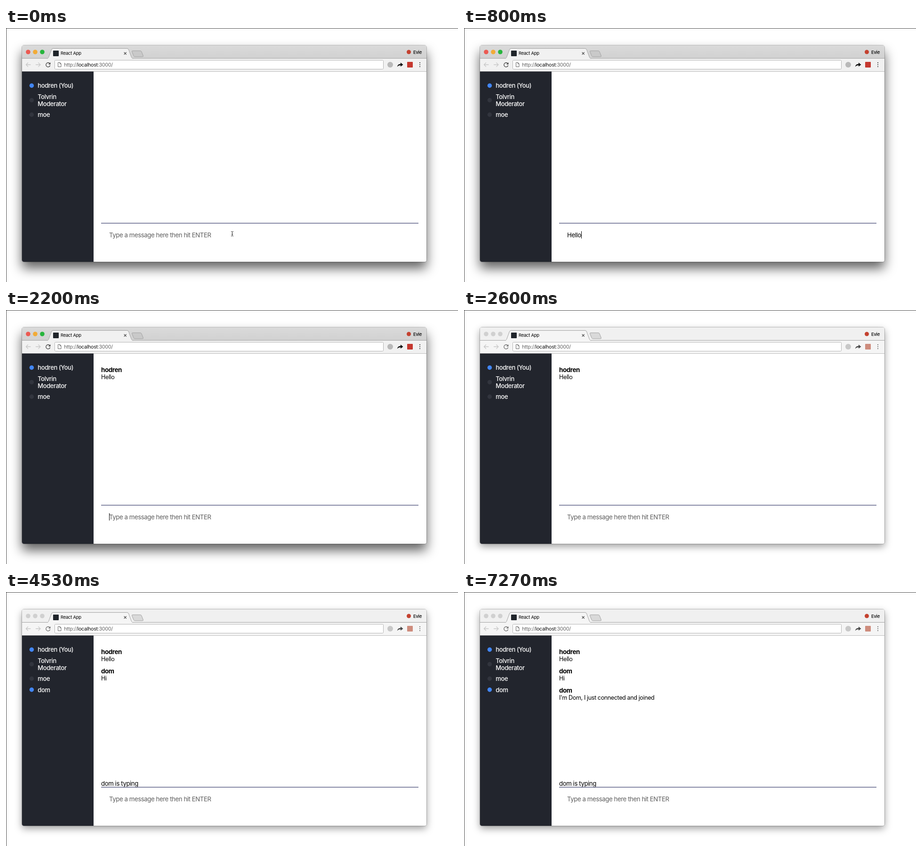
Animation, 960 px wide and 540 px high, one loop 8000 ms. Source, as an HTML page:

```html
<!DOCTYPE html>
<html lang="en">
<head>
<meta charset="utf-8">
<title>Chat demo</title>
<style>
  html, body { margin: 0; width: 100%; height: 100%; overflow: hidden; background: #fff; }
  svg { display: block; width: 960px; height: 540px; }
  text { font: 13.2px Inter, "Open Sans", sans-serif; letter-spacing: -.031em; white-space: pre; }
  .name { font-weight: 700; font-size: 13.4px; }
  .msg { font-size: 12.57px; }
  .side { fill: #fff; font-weight: 500; font-size: 13px; }
  .hint { fill: #5d5d5d; }
  .tab { font-size: 9.5px; }
  .url { font-size: 10.8px; fill: #666; }
  .line { fill: none; stroke-width: 1.3; }
</style>
</head>
<body>
<svg viewBox="0 0 960 540">
  <defs>
    <filter id="wide" x="-10%" y="-15%" width="120%" height="135%"><feGaussianBlur stdDeviation="12"/></filter>
    <filter id="soft" x="-10%" y="-15%" width="120%" height="130%"><feGaussianBlur stdDeviation="8"/></filter>
    <linearGradient id="bar" x2="0" y2="1"><stop stop-color="#dadada"/><stop offset="1" stop-color="#d1d1d1"/></linearGradient>
    <clipPath id="frame"><rect x="34" y="37" width="859" height="460" rx="4"/></clipPath>
  </defs>
  <rect width="960" height="540" fill="#fff"/>
  <rect id="shadowOn" x="34" y="51" width="859" height="460" rx="4" fill-opacity=".62" filter="url(#wide)"/>
  <rect id="shadowOff" x="34" y="43" width="859" height="460" rx="4" fill-opacity=".38" filter="url(#soft)"/>
  <path d="M0 .5H960M.5 0V540" stroke="#4a4a4a"/>
  <rect x="33.5" y="36.5" width="860" height="461" rx="4.5" fill="none" stroke="#000" stroke-opacity=".22"/>

  <g clip-path="url(#frame)">
    <rect x="34" y="37" width="859" height="460" fill="#fff"/>
    <rect id="titleBar" x="34" y="37" width="859" height="28"/>
    <rect id="toolBar" x="34" y="64" width="859" height="28"/>
    <path d="M34 64.5H88M269 64.5H893" stroke="#a3a3a3"/>
    <path d="M34 92.5H893" stroke="#bdbdbd"/>
    <path id="tabShape" d="M87 65C90 64.5 90 63 91 61L96.500 46Q97.500 43.500 100 43.500H257Q259.500 43.500 260.500 46L266 61C267 63 267 64.500 270 65" stroke="#a3a3a3"/>
    <path id="newTab" d="M269 48.500H285Q287 48.500 287.700 50L291.300 59Q292 61 290 61H274Q272 61 271.300 59.500L267.600 50.500Q267 48.500 269 48.500Z" stroke="#a3a3a3"/>
    <g id="lights"></g>
    <rect x="100" y="48" width="12" height="12" rx="1" fill="#20252b"/>
    <text class="tab" x="116" y="57.300">React App</text>
    <path d="M250.700 51.500l5 5m0-5l-5 5" stroke="#4c4c4c" stroke-width="1.200"/>
    <circle cx="855.500" cy="51" r="4.500" fill="#c4412f"/>
    <text class="tab" x="865" y="54.500" font-weight="500" style="font-weight:500">Evie</text>

    <rect x="103.500" y="68.500" width="698" height="19" rx="2" fill="#fff" stroke="#b4b4b4"/>
    <path class="line" d="M52.500 78H42.500M47 73.500L42.500 78L47 82.500M63 78H73M68.500 73.500L73 78L68.500 82.500" stroke="#c9c9c9"/>
    <path d="M110.500 73.500H114.500L117 76V82.500H110.500ZM114.500 73.500V76H117" fill="none" stroke="#666"/>
    <text class="url" x="123" y="81.600">http://<tspan fill="#111">localhost</tspan>:3000/</text>
    <g id="icons">
      <path class="line" d="M93 75.600A4.500 4.500 0 1 0 93.700 79.500" stroke="#444" stroke-width="1.500"/>
      <path d="M94.500 73V77.500H90Z" fill="#444"/>
      <circle cx="816" cy="78" r="6" fill="#b9b9b9"/>
      <path d="M831 82.500C831.500 78.500 834 76.500 838 76.500V73.500L843.500 78L838 82V79.300C835 79.300 833 80 831 82.500Z" fill="#111"/>
      <rect id="badge" x="852" y="72" width="12" height="12" rx="1"/>
      <path d="M879 73.900h.01M879 78h.01M879 82.100h.01" stroke="#444" stroke-width="2.200" stroke-linecap="round"/>
    </g>

    <rect x="34" y="92.500" width="152" height="405" fill="#22252d"/>
    <g id="people"></g>
    <g id="messages"></g>
    <text id="typing" x="202" y="412">dom is typing</text>
    <path d="M202 415H876" stroke="#5f6388" stroke-width="1.300"/>
    <text id="hint" class="hint" x="219" y="445">Type a message here then hit ENTER</text>
    <text id="draft" x="219" y="445"></text>
    <path id="caret" d="M0 432V447.500" stroke="#000"/>
    <path id="beam" d="M478 432.500Q480.500 432.500 480.500 434.500V440.500Q480.500 442.500 478 442.500M483 432.500Q480.500 432.500 480.500 434.500M480.500 440.500Q480.500 442.500 483 442.500M479 438.500H482" fill="none" stroke="#333"/>
  </g>
</svg>
<script>
const LOOP = 8000;
const BLUR_AT = 2600, SENT_AT = 1130;
const KEY_TIMES = [200, 400, 530, 670, 800];
const WORD = 'Hello';
const NS = 'http://www.w3.org/2000/svg';
const $ = id => document.getElementById(id);

function add(parent, tag, attrs, text) {
  const el = document.createElementNS(NS, tag);
  for (const key in attrs) el.setAttribute(key, attrs[key]);
  if (text) el.textContent = text;
  parent.appendChild(el);
  return el;
}

const show = (el, on) => el.setAttribute('visibility', on ? 'visible' : 'hidden');
const within = (t, from, to) => t >= from && t < to;

const lights = ['#ec5a52', '#f2ab37', '#27b53c'].map((color, i) =>
  ({ color, el: add($('lights'), 'circle', { cx: 47 + 15 * i, cy: 51, r: 4.8 }) }));

function person(y, online, lines, at = 0) {
  const el = add($('people'), 'g', {});
  add(el, 'circle', { cx: 54.5, cy: y, r: 4.7, fill: online ? '#4286f5' : '#32353e' });
  const top = y + 4.8 - (lines.length - 1) * 7.7;
  lines.forEach((line, i) =>
    add(el, 'text', { class: 'side', x: 67.3, y: top + 15.4 * i }, line));
  return { el, at };
}

function message(y, name, body, at) {
  const el = add($('messages'), 'g', {});
  add(el, 'text', { class: 'name', x: 202, y }, name);
  add(el, 'text', { class: 'msg', x: 202, y: y + 15 }, body);
  return { el, at };
}

const arrivals = [
  person(122.5, true, ['hodren (You)']),
  person(153.5, false, ['Tolvrin', 'Moderator']),
  person(184.3, false, ['moe']),
  person(207.8, true, ['dom'], 2730),
  message(132, 'hodren', WORD, 1400),
  message(173.3, 'dom', 'Hi', 4530),
  message(214, 'dom', "I'm Dom, I just connected and joined", 6800)
];

function drawWindow(active) {
  show($('shadowOn'), active);
  show($('shadowOff'), !active);
  $('titleBar').setAttribute('fill', active ? 'url(#bar)' : '#f0f0f0');
  $('toolBar').setAttribute('fill', active ? '#f1f1f1' : '#f5f5f5');
  $('tabShape').setAttribute('fill', active ? '#f1f1f1' : '#f5f5f5');
  $('newTab').setAttribute('fill', active ? '#c9c9c9' : '#d9d9d9');
  $('badge').setAttribute('fill', active ? '#c5382f' : '#c26a55');
  $('icons').setAttribute('opacity', active ? 1 : 0.75);
  lights.forEach(({ el, color }) => el.setAttribute('fill', active ? color : '#d0d0d0'));
}

function drawInput(t) {
  const typed = t < SENT_AT ? KEY_TIMES.filter(k => t >= k).length : 0;
  const draft = $('draft');
  draft.textContent = WORD.slice(0, typed);
  show($('hint'), !typed);
  show($('beam'), t < KEY_TIMES[0]);
  show($('caret'), within(t, KEY_TIMES[0], 1600) || within(t, 2070, BLUR_AT));
  const end = typed ? draft.getComputedTextLength() : 0;
  $('caret').setAttribute('transform', `translate(${219.5 + Math.round(end)} 0)`);
}

function draw(t) {
  drawWindow(t < BLUR_AT);
  drawInput(t);
  arrivals.forEach(({ el, at }) => show(el, t >= at));
  show($('typing'), within(t, 4000, 6930) || t >= 7270);
}

const start = performance.now();
function tick() {
  draw((performance.now() - start) % LOOP);
  requestAnimationFrame(tick);
}
tick();
</script>
</body>
</html>
```
